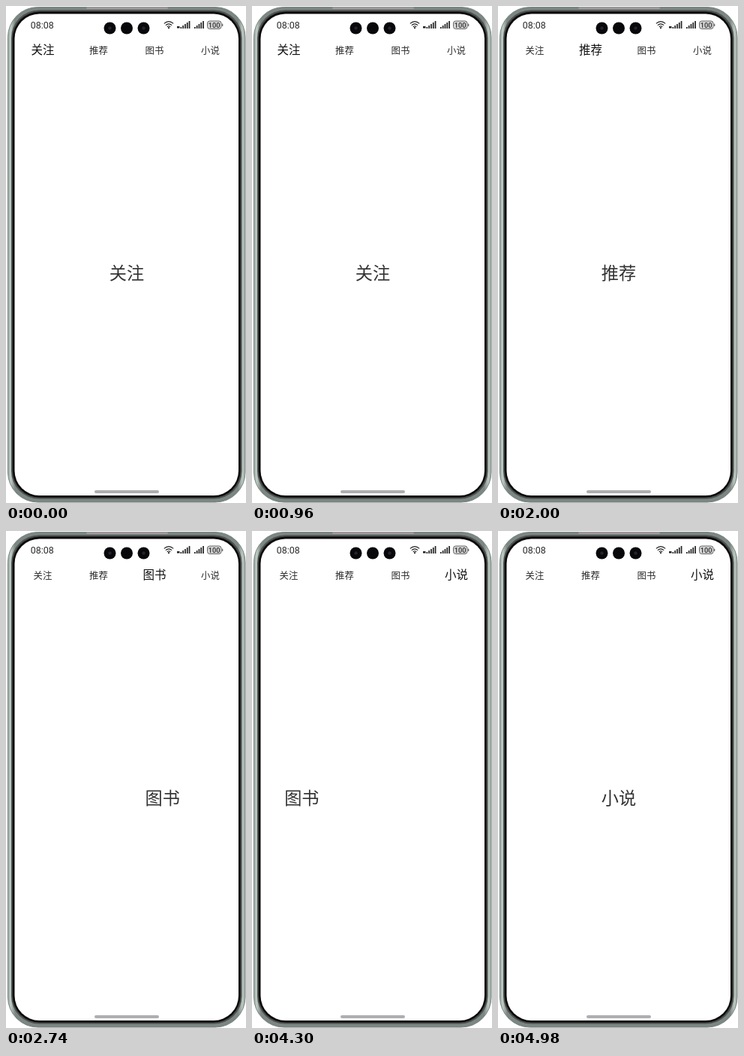
Recreate the animation shown at these times as an HTML page. Size 320 px wide and 662 px high, loop 5.65 s.

```html
<!DOCTYPE html>
<html lang="zh-CN">
<head>
<meta charset="utf-8">
<style>
  html, body { margin: 0; width: 100%; height: 100%; overflow: hidden; background: #fff; }
  svg { display: block; width: 320px; height: 662px; }
  text { font-family: "Noto Sans CJK SC", "Noto Sans CJK", sans-serif; text-anchor: middle; fill: #2b2b2b; }
  .status text { font-family: Roboto, sans-serif; }
  .tab { font-size: 12.4px; }
  .tab.active { font-size: 15.5px; font-weight: 500; fill: #111; }
  .page { font-size: 23.2px; fill: #333; }
</style>
</head>
<body>
<svg viewBox="0 0 320 662">
  <defs>
    <clipPath id="screen"><rect x="11.5" y="10.5" width="298.5" height="641.5" rx="33"/></clipPath>
    <linearGradient id="metal">
      <stop offset="0" stop-color="#9aa8a1"/>
      <stop offset=".012" stop-color="#c0ccc6"/>
      <stop offset=".03" stop-color="#7c8682"/>
      <stop offset=".97" stop-color="#7c8682"/>
      <stop offset=".988" stop-color="#bcc8c2"/>
      <stop offset="1" stop-color="#99a69f"/>
    </linearGradient>
  </defs>

  <g id="body">
    <rect x="2.5" y="1.5" width="316.5" height="659.5" rx="40" fill="url(#metal)" stroke="#77837d"/>
    <rect x="7" y="5.5" width="307.5" height="651" rx="37" fill="#4a4f4d"/>
    <rect x="8.8" y="7.5" width="303.8" height="647.3" rx="36" fill="#0c0a0a"/>
    <rect x="11.5" y="10.5" width="298.5" height="641.5" rx="33" fill="#fff"/>
    <rect x="107" y="1.5" width="109" height="2.4" rx="1.2" fill="#a59b9c"/>
  </g>

  <g clip-path="url(#screen)"><g id="pages"></g></g>
  <g id="tabs"></g>

  <g class="status">
    <text x="48.3" y="30" font-size="12.5">08:08</text>
    <g id="cameras" fill="#08080b"></g>
    <g fill="none" stroke="#222" stroke-width="1.2">
      <path d="M210.8 23.4Q217 18 223.2 23.4M212.8 25.6Q217 22 221.2 25.6M214.8 27.7Q217 25.8 219.2 27.7"/>
      <circle cx="217" cy="29.2" r=".5"/>
    </g>
    <g id="signal" fill="#222"></g>
    <rect x="268.5" y="20" width="18.5" height="10.5" rx="3" fill="#d6d6d6" stroke="#666"/>
    <rect x="288" y="23.5" width="1.3" height="3.6" rx=".6" fill="#666"/>
    <text x="277.7" y="28.6" font-size="9.2" font-weight="500">100</text>
  </g>
  <rect x="118" y="645" width="86" height="4" rx="2" fill="#aeadb1"/>
</svg>
<script>
const LOOP = 5650, STEP = 40, PAGE_WIDTH = 300, SPRING = 18.1;
const titles = ['关注', '推荐', '图书', '小说'];

// The first drag pulls against the edge and springs back; the others turn one page.
const swipes = [
  { start: 120, drag: 240, reach: -.08, turn: 0 },
  { start: 1120, drag: 180, reach: .3, turn: 1 },
  { start: 2420, drag: 180, reach: .3, turn: 1 },
  { start: 4020, drag: 260, reach: .25, turn: 1 }
];

function add(parent, tag, attributes, text = '') {
  const node = document.createElementNS('http://www.w3.org/2000/svg', tag);
  for (const name in attributes) node.setAttribute(name, attributes[name]);
  node.textContent = text;
  document.getElementById(parent).append(node);
  return node;
}

const tabs = titles.map((title, i) => {
  add('pages', 'text', { class: 'page', x: 161 + i * PAGE_WIDTH, y: 363.6 }, title);
  return add('tabs', 'text', { class: 'tab', x: 49 + i * 74.5, y: 64 }, title);
});

for (const x of [138.5, 161, 183.5]) {
  add('cameras', 'circle', { cx: x, cy: 29.5, r: 8 });
  if (x !== 161) add('cameras', 'circle', { cx: x, cy: 29.5, r: 2.2, fill: '#23232c' });
}

function bars(x, count, pitch) {
  for (let i = 0; i < count; i++) {
    const height = 2 + 8 * i / (count - 1);
    add('signal', 'rect', { x: x + i * pitch, y: 30 - height, width: 1.7, height });
  }
}
add('signal', 'rect', { x: 228, y: 27, width: 3.5, height: 2.5 });
bars(232.5, 5, 2.8);
bars(251, 5, 2.8);

// A finger drag that speeds up, then a critically damped spring to rest.
function travel(ms, { drag, reach, turn }) {
  if (ms <= 0) return 0;
  if (ms < drag) return reach * (ms / drag) ** 2;
  const s = (ms - drag) / 1000, gap = turn - reach, speed = 2000 * reach / drag;
  return turn - (gap + (SPRING * gap - speed) * s) * Math.exp(-SPRING * s);
}

const pages = document.getElementById('pages');
function draw() {
  const time = performance.now() % LOOP;
  let position = 0, active = 0;
  for (const swipe of swipes) {
    const ms = Math.floor((time - swipe.start) / STEP) * STEP;
    position += travel(ms, swipe);
    if (ms >= swipe.drag) active += swipe.turn;
  }
  pages.setAttribute('transform', `translate(${-position * PAGE_WIDTH} 0)`);
  tabs.forEach((tab, i) => tab.classList.toggle('active', i === active));
  requestAnimationFrame(draw);
}
draw();
</script>
</body>
</html>
```
